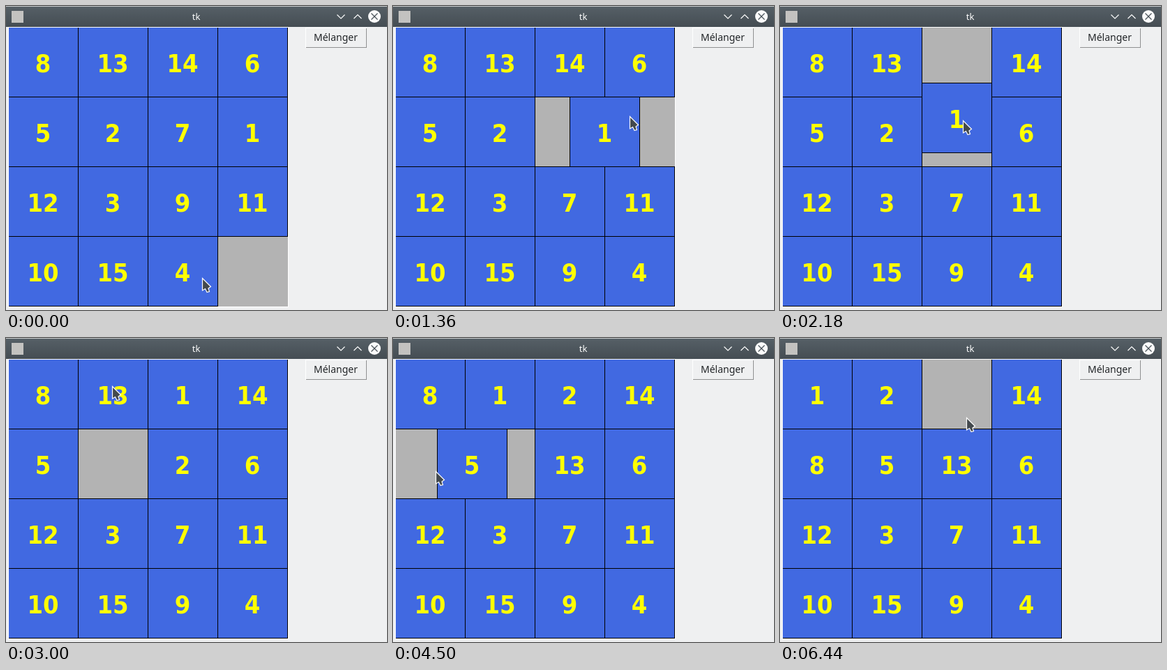
Animation of 546x436 px, one loop 6600 ms. Source, as an HTML page with a canvas:

```html
<!DOCTYPE html>
<html lang="fr">
<head>
<meta charset="utf-8">
<title>tk</title>
<style>
html, body { margin: 0; width: 100%; height: 100%; overflow: hidden; background: #eff0f1; }
canvas { display: block; }
</style>
</head>
<body>
<canvas id="stage" width="546" height="436"></canvas>
<script>
const ctx = document.getElementById('stage').getContext('2d');
const LOOP = 6600, SLIDE = 300, CELL = 100, STEPS = 10;
const START = [8, 13, 14, 6, 5, 2, 7, 1, 12, 3, 9, 11, 10, 15, 4, 0];

// Bursts of slides: start time, then the tiles clicked one after another.
const BURSTS = [
  [380, 4], [740, 9, 7], [1205, 1, 6, 14, 1], [2680, 2, 13, 1], [3665, 2],
  [4080, 13], [4310, 5], [4700, 8], [5078, 1], [5700, 2]
];

// Where the pointer rests inside a cell, drifting slowly: time, x, y
const GRIP = [
  [0, 78, 61], [1360, 36, 29], [2180, 59, 35], [3700, 41, 44],
  [4500, 58, 62], [5320, 67, 65], [6440, 64, 85]
];

const clamp = v => Math.min(1, Math.max(0, v));
const mix = (a, b, p) => a + (b - a) * p;
const mixPoint = (a, b, p) => [mix(a[0], b[0], p), mix(a[1], b[1], p)];
const cellPoint = i => [3 + CELL * (i % 4), 30 + CELL * (i >> 2)];

// The empty cell tells where each clicked tile goes.
const cells = START.slice();
const slides = BURSTS.flatMap(([at, ...tiles]) =>
  tiles.map((tile, i) => ({ tile, start: at + i * SLIDE })));
slides.forEach((slide, i) => {
  const next = slides[i + 1];
  slide.length = Math.min(SLIDE, (next ? next.start : LOOP) - slide.start);
  const from = cells.indexOf(slide.tile), to = cells.indexOf(0);
  slide.from = cellPoint(from);
  slide.to = cellPoint(to);
  cells[to] = slide.tile;
  cells[from] = 0;
});

function rect(color, x, y, w, h) {
  ctx.fillStyle = color;
  ctx.fillRect(x, y, w, h);
}

function text(str, x, y, color, font) {
  ctx.fillStyle = color;
  ctx.font = font;
  ctx.textAlign = 'center';
  ctx.fillText(str, x, y);
}

function line(color, ...points) {
  ctx.strokeStyle = color;
  ctx.lineWidth = 1.2;
  ctx.beginPath();
  points.forEach(([x, y]) => ctx.lineTo(x, y));
  ctx.stroke();
}

function drawWindow() {
  rect('#eff0f1', 0, 0, 546, 436);
  const bar = ctx.createLinearGradient(0, 0, 0, 30);
  bar.addColorStop(0, '#566067');
  bar.addColorStop(1, '#454d53');
  rect(bar, 0, 0, 546, 30);
  rect('#c8cacb', 0, 0, 546, 1);
  rect('#c3c2c0', 8, 7, 17, 17);
  text('tk', 272.5, 20, '#fcfcfc', '13px "Noto Sans", sans-serif');
  line('#fcfcfc', [474.5, 12.5], [480, 18], [485.5, 12.5]);
  line('#fcfcfc', [498.5, 18], [504, 12.5], [509.5, 18]);
  ctx.fillStyle = '#fcfcfc';
  ctx.beginPath();
  ctx.arc(528, 15, 9, 0, 7);
  ctx.fill();
  line('#4b545a', [523.5, 10.5], [532.5, 19.5]);
  line('#4b545a', [532.5, 10.5], [523.5, 19.5]);

  rect('#fff', 429, 31, 88, 29);
  rect('#8f9091', 430, 32, 87, 28);
  rect('#eff0f1', 430, 32, 86, 27);
  text('Mélanger', 472.5, 50, '#232629', '14px "Noto Sans", sans-serif');
}

function drawTile(n, x, y) {
  rect('#000', x, y, 101, 101);
  rect('#4169e1', x + 1, y + 1, 99, 99);
  text(n, x + 50, y + 65, '#ff0',
    'bold condensed 36px "DejaVu Sans Condensed", "DejaVu Sans", sans-serif');
}

function drawBoard(t) {
  rect('#fff', 3, 30, 402, 402);
  ctx.save();
  ctx.beginPath();
  ctx.rect(4, 31, 400, 400);
  ctx.clip();
  rect('#b3b3b3', 4, 31, 400, 400);
  START.forEach((n, i) => {
    if (!n) return;
    const slide = slides.filter(s => s.tile === n && s.start <= t).pop();
    let point = cellPoint(i);
    if (slide) {
      const p = Math.floor(clamp((t - slide.start) / slide.length) * STEPS) / STEPS;
      point = mixPoint(slide.from, slide.to, p);
    }
    drawTile(n, ...point.map(Math.round));
  });
  ctx.restore();
}

// The pointer stays on the clicked cell, then glides to reach the next one in time.
function pointerAt(t) {
  const i = Math.max(0, slides.findLastIndex(s => s.start <= t));
  const here = slides[i], next = slides[i + 1] || here;
  const glide = Math.min(SLIDE, (next.start - here.start) / 2) || 1;
  const p = next === here ? 0 : clamp(1 - (next.start - t) / glide);
  const cell = mixPoint(here.from, next.from, p * p * (3 - 2 * p));

  const k = Math.max(1, GRIP.findIndex(g => g[0] > t));
  const [a, b] = t < GRIP.at(-1)[0] ? [GRIP[k - 1], GRIP[k]] : GRIP.slice(-2);
  const grip = mixPoint(a.slice(1), b.slice(1), clamp((t - a[0]) / (b[0] - a[0])));
  return [Math.round(cell[0] + grip[0]), Math.round(cell[1] + grip[1])];
}

const arrow = new Path2D('M.5 -.5V17L4.5 14.5L7 19.5L10.5 18.5L9 14L12.5 11.5Z');

function drawPointer(t) {
  ctx.save();
  ctx.translate(...pointerAt(t));
  ctx.fillStyle = '#43494d';
  ctx.fill(arrow);
  ctx.strokeStyle = '#fcfcfc';
  ctx.lineWidth = 1.2;
  ctx.stroke(arrow);
  ctx.restore();
}

function frame() {
  const t = performance.now() % LOOP;
  drawWindow();
  drawBoard(t);
  drawPointer(t);
  requestAnimationFrame(frame);
}
frame();
</script>
</body>
</html>
```
